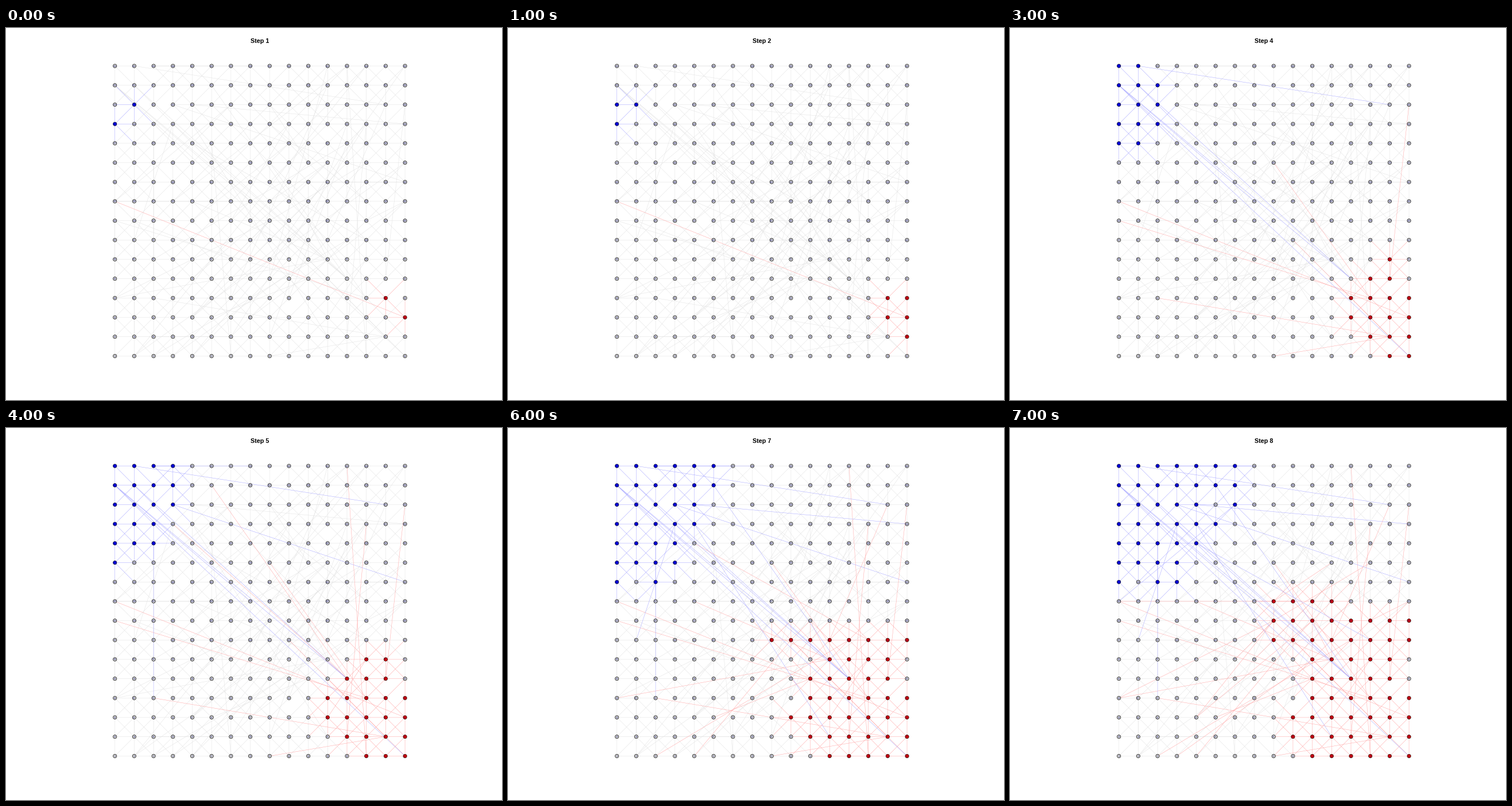
Write a matplotlib script that moves like this. It is 864x648 px and loops after 8 s.

```python
import random
from math import hypot

import matplotlib.pyplot as plt
from matplotlib.animation import FuncAnimation
from matplotlib.collections import LineCollection

W, H = 864, 648
N = 16
X0, Y0, GAP = 189.7, 66.1, 33.69
NEVER = 99
GRAY, RED, BLUE = range(3)
EDGE_COLORS = ["#e2e2e2", "#ffa4a4", "#a4a4ff"]
NODE_COLORS = ["#c8c8c8", "#e00000", "#0000e6"]

# Nodes are (column, row), rows counted from the top
SEEDS = {(1, 2): BLUE, (0, 3): BLUE, (14, 12): RED, (15, 13): RED}
IMMUNE = {(1, 6), (4, 5), (5, 2), (15, 10), (15, 11),
          (9, 11), (9, 12), (8, 12), (8, 13)}
# Hubs that many shortcuts share
HUBS = {
    (0, 1): [(15, 15), (7, 7), (12, 11)],
    (12, 11): [(1, 1), (3, 3), (5, 1)],
    (14, 14): [(2, 12), (8, 15), (9, 9)],
    (8, 8): [(0, 12), (4, 13), (6, 10)],
    (13, 12): [(0, 8), (8, 5)],
    (15, 13): [(0, 7)],
    (14, 11): [(15, 2)],
    (14, 2): [(1, 0), (11, 9)],
    (4, 2): [(15, 3)],
    (2, 4): [(2, 12)],
}
SHORTCUTS = 45


def blue_start(c, r):
    """A disc grows first, then a front moves right."""
    if c < 3:
        return round(1 + 1.53 * hypot(c - 0.45, r - 2.1))
    return round(c + 2 + 0.8 * max(0, r - 2))


def red_start(c, r):
    """A front moves left, widening, then climbs row by row."""
    k = N - 1 - c
    if r < 10:
        return 8 if r == 7 and k > 3 else 16 - r
    return k + 1 + max(r - 13, 12 - r, 0)


def start(c, r):
    """Colour of a node and the step at which it takes that colour."""
    if (c, r) in SEEDS:
        return SEEDS[c, r], 1
    if (c, r) not in IMMUNE:
        if c < 8 and r < 8:
            return BLUE, max(2, blue_start(c, r))
        if c >= 8 and r >= 7:
            return RED, max(2, red_start(c, r))
    return GRAY, NEVER


def build_edges():
    """Neighbour lattice with some gaps, hub links and random shortcuts."""
    rng = random.Random(7)
    edges = [(hub, end) for hub, ends in HUBS.items() for end in ends]
    for c, r in NODES:
        for dc, dr in ((1, 0), (0, 1), (1, 1), (-1, 1)):
            end = c + dc, r + dr
            if end in STARTS and rng.random() > 0.08:
                edges.append(((c, r), end))
    calm = [n for n in NODES if STARTS[n][1] > 4]
    return edges + [tuple(rng.sample(calm, 2)) for _ in range(SHORTCUTS)]


def state(node, step):
    color, first = STARTS[node]
    return color if step >= first else GRAY


def place(node):
    return X0 + GAP * node[0], Y0 + GAP * node[1]


NODES = [(c, r) for r in range(N) for c in range(N)]
STARTS = {n: start(*n) for n in NODES}
EDGES = build_edges()

fig = plt.figure(figsize=(W / 72, H / 72), dpi=72, facecolor="white")
ax = fig.add_axes([0, 0, 1, 1])
ax.set(xlim=(0, W), ylim=(H, 0))
ax.axis("off")

lines = LineCollection([], linewidths=0.5, zorder=1)
lines.set_snap(False)
ax.add_collection(lines)
dots = ax.scatter(*zip(*map(place, NODES)), s=6.3 ** 2,
                  edgecolors="black", linewidths=0.65, zorder=2)
for c, r in NODES:
    ax.text(*place((c, r)), str((N - 1 - r) * N + c + 1), size=3.7,
            color="darkblue", alpha=0.6, family="Liberation Sans",
            ha="center", va="center_baseline", zorder=3)
title = ax.text(442, 26, "", size=10.8, weight="bold", ha="center",
                va="baseline", family="Liberation Sans")


def draw(frame):
    step = frame + 1
    title.set_text(f"Step {step}")
    dots.set_facecolors([NODE_COLORS[state(n, step)] for n in NODES])
    ranked = sorted((max(state(a, step), state(b, step)), a, b)
                    for a, b in EDGES)
    lines.set_segments([[place(a), place(b)] for _, a, b in ranked])
    lines.set_color([EDGE_COLORS[k] for k, _, _ in ranked])
    return lines, dots, title


anim = FuncAnimation(fig, draw, frames=8, interval=1000, repeat=True)
plt.show()
```
